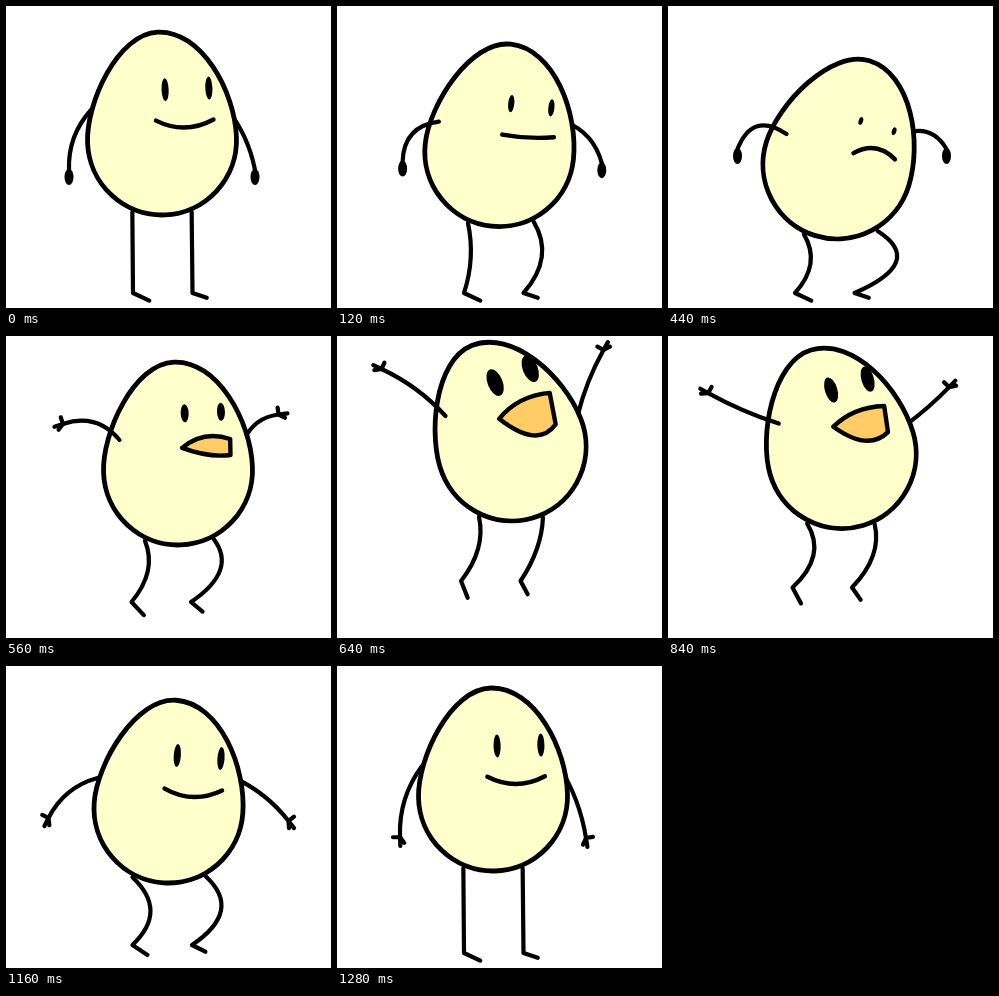
An HTML page with a canvas for the animation above (1320 ms loop, 325 px wide and 302 px high).

```html
<!DOCTYPE html>
<html lang="en">
<head>
<meta charset="utf-8">
<title>Jumping egg</title>
<style>
  html, body { margin: 0; width: 100%; height: 100%; overflow: hidden; background: #fff; }
  canvas { display: block; }
</style>
</head>
<body>
<canvas id="stage" width="325" height="302"></canvas>
<script>
const ctx = document.getElementById('stage').getContext('2d');
const LOOP = 1320, STEP = 40, HANDS_OPEN = 560;

// x, y: belly centre; tilt in radians; lift: feet above ground; bowL, bowR: knee bows;
// handL*, handR*, shoulder: relative to the belly; bend: elbow; look: eye height on the face
const stand = {
  x: 156, y: 134, tilt: -.04, lift: 0, bowL: 0, bowR: 0,
  shoulder: -71, handLx: -93, handLy: 30, handRx: 93, handRy: 30, bend: 13,
  look: -50, eye: 11.5, smile: 15, open: 0
};
const dip = {
  ...stand, x: 168, y: 156, tilt: .235, bowL: 9, bowR: 25,
  shoulder: -51, handLx: -100, handLy: -8, handRx: 111, handRy: -5, bend: 32,
  look: -48, eye: 6, smile: -7
};
const crouch = {
  ...dip, x: 169.5, y: 158, tilt: .3, bowL: 11, bowR: 30,
  handLy: -15, handRx: 109, handRy: -15, eye: 4, smile: -16
};
const cheer = {
  x: 174.5, y: 110, tilt: -.377, lift: 42, bowL: 8, bowR: 5,
  shoulder: -66, handLx: -130, handLy: -77, handRx: 92, handRy: -96, bend: 8,
  look: -65, eye: 14, smile: 9, open: 1
};
const glide = {
  x: 172, y: 132, tilt: -.117, lift: 23, bowL: 24, bowR: 18,
  shoulder: -57, handLx: -140, handLy: -29, handRx: 137, handRy: -10, bend: -26,
  look: -62, eye: 11, smile: 2, open: .5
};
const land = {
  ...stand, x: 162.5, y: 142, tilt: .07, lift: 8, bowL: 18, bowR: 22,
  handLx: -120, handLy: 10, handRx: 120, handRy: 13, bend: 14, look: -53
};
const rise = { ...stand, y: 130, tilt: -.02, handLy: 41, handRy: 42 };

// time, pose, easing towards the next key (positive eases out, negative eases in)
const keys = [
  [0, stand, .4], [280, dip, .8], [440, crouch, 0], [520, crouch, .75], [640, cheer, -1.2],
  [960, glide, 0], [1160, land, .5], [1280, rise, 0], [LOOP, stand, 0]
];

function poseAt(t) {
  const next = keys.findIndex(key => key[0] > t);
  const [start, from, ease] = keys[next - 1];
  const [end, to] = keys[next];
  const u = (t - start) / (end - start);
  const k = u + ease * u * (1 - u);
  const pose = {};
  for (const name in from) pose[name] = from[name] + (to[name] - from[name]) * k;
  return pose;
}

function drawBody() {
  ctx.beginPath();
  ctx.ellipse(0, 0, 74.5, 75, 0, 0, Math.PI);
  ctx.bezierCurveTo(-74.5, -40, -40, -108, 0, -108);
  ctx.bezierCurveTo(44, -108, 74.5, -46, 74.5, 0);
  ctx.fillStyle = '#ffffcc';
  ctx.fill();
  ctx.lineWidth = 4.8;
  ctx.stroke();
}

function drawHand(x, y, angle, side, open) {
  ctx.save();
  ctx.translate(x, y);
  ctx.beginPath();
  if (open) {
    ctx.rotate(angle);
    for (const [fx, fy] of [[9, 0], [0, 7], [6, -4]]) {
      ctx.moveTo(0, 0);
      ctx.lineTo(fx, fy * side);
    }
    ctx.stroke();
  } else {
    ctx.ellipse(0, 7, 4.5, 8, 0, 0, 2 * Math.PI);
    ctx.fillStyle = '#000';
    ctx.fill();
  }
  ctx.restore();
}

function drawArm(shoulder, x, y, bend, side, open) {
  const top = -30;
  const dx = x - shoulder, dy = y - top;
  const push = side * bend / Math.hypot(dx, dy);
  const elbowX = (shoulder + x) / 2 - dy * push;
  const elbowY = (top + y) / 2 + dx * push;
  ctx.lineWidth = 4.2;
  ctx.beginPath();
  ctx.moveTo(shoulder, top);
  ctx.quadraticCurveTo(elbowX, elbowY, x, y);
  ctx.stroke();
  drawHand(x, y, Math.atan2(y - elbowY, x - elbowX), side, open);
}

// The toes hang further down the higher the foot is lifted.
function drawLeg(p, side, ankleX, bow, toeLength, toeAngle) {
  const spread = .39 + bow * .005;
  const hipX = p.x + side * 78 * Math.sin(spread);
  const hipY = p.y + 78 * Math.cos(spread);
  const footX = ankleX - p.lift * .07, footY = 287 - p.lift;
  const angle = toeAngle + p.lift * .018;
  ctx.lineWidth = 4.2;
  ctx.beginPath();
  ctx.moveTo(hipX, hipY);
  ctx.quadraticCurveTo((hipX + footX) / 2 + 2 * bow, (hipY + footY) / 2, footX, footY);
  ctx.lineTo(footX + toeLength * Math.cos(angle), footY + toeLength * Math.sin(angle));
  ctx.stroke();
}

function drawEyes({ look, eye, open }) {
  const gap = 30 + 1.2 * eye - 9 * open;
  ctx.fillStyle = '#000';
  for (const side of [-.5, .5]) {
    ctx.beginPath();
    ctx.ellipse(27 + side * gap, look, 1.5 + .18 * eye + 3.5 * open * open, eye, 0, 0, 2 * Math.PI);
    ctx.fill();
  }
}

// A closed mouth is a beak whose upper and lower edges coincide.
function drawMouth({ look, smile, open, tilt }) {
  const half = 25 + smile * .25;
  ctx.translate(28 - smile * .3, look * .38);
  ctx.rotate(-tilt / 2);
  ctx.beginPath();
  ctx.moveTo(-half, 0);
  ctx.quadraticCurveTo(-5 * open, smile - 28 * open, half, -16 * open);
  ctx.lineTo(half, 16 * open);
  ctx.quadraticCurveTo(5 * open, smile + 28 * open, -half, 0);
  ctx.fillStyle = '#ffcc66';
  ctx.fill();
  ctx.lineWidth = 4.4;
  ctx.stroke();
}

function draw(t) {
  const p = poseAt(t);
  const open = t >= HANDS_OPEN;
  ctx.fillStyle = '#fff';
  ctx.fillRect(0, 0, 325, 302);
  ctx.strokeStyle = '#000';
  ctx.lineCap = ctx.lineJoin = 'round';
  ctx.save();
  ctx.translate(p.x, p.y);
  drawArm(66, p.handRx, p.handRy, p.bend * .6, -1, open);
  ctx.rotate(p.tilt);
  drawBody();
  ctx.rotate(-p.tilt);
  drawArm(p.shoulder, p.handLx, p.handLy, p.bend, 1, open);
  ctx.rotate(p.tilt);
  drawEyes(p);
  drawMouth(p);
  ctx.restore();
  drawLeg(p, -1, 127, p.bowL, 18, .44);
  drawLeg(p, 1, 186.5, p.bowR, 15, .32);
}

const began = performance.now();
function tick() {
  const t = (performance.now() - began) % LOOP;
  draw(Math.floor(t / STEP) * STEP);
  requestAnimationFrame(tick);
}
tick();
</script>
</body>
</html>
```
